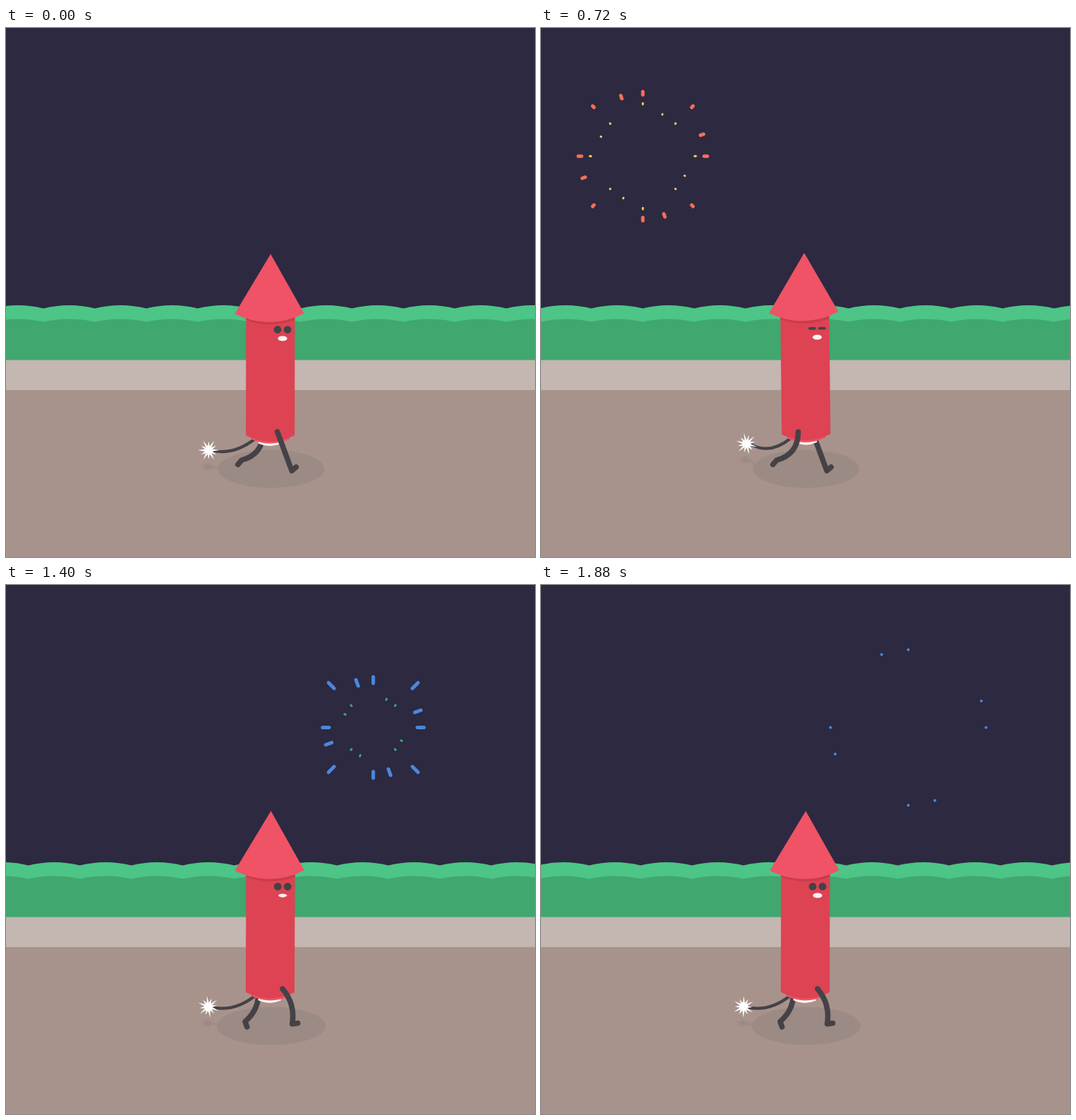
These frames come from a looping animation (748x748 px, 1.92 s). An HTML page with a canvas:

```html
<!DOCTYPE html>
<html lang="en">
<head>
<meta charset="utf-8">
<title>Walking rocket</title>
<style>
  html, body { margin: 0; width: 100%; height: 100%; overflow: hidden; background: #2c2941; }
  canvas { display: block; width: 100vw; height: 100vh; }
</style>
</head>
<body>
<canvas id="stage" width="748" height="748"></canvas>
<script>
const ctx = document.getElementById('stage').getContext('2d');
const SIZE = 748, LOOP = 1920, STEP = 40, STRIDE = 480, TAU = Math.PI * 2;
const DARK = '#454247', RED = '#dd4353', PINK = '#ef5365', SHADE = '#9c8b84', WHITE = '#fbf3f1';

const clamp = v => Math.max(0, Math.min(1, v));
const wave = (t, period, shift = 0) => Math.cos(TAU * (t - shift) / period);
// Rises and falls once between start and start + span
const arch = (t, start, span, skew = 1) => Math.sin(Math.PI * clamp((t - start) / span) ** skew);
// Fast start, slow finish
const glide = (t, start, end) => 1 - (1 - clamp((t - start) / (end - start))) ** 2.5;

function fill(color, d) {
  ctx.fillStyle = color;
  ctx.fill(new Path2D(d));
}

function line(color, width, d) {
  ctx.strokeStyle = color;
  ctx.lineWidth = width;
  ctx.lineCap = ctx.lineJoin = 'round';
  ctx.stroke(new Path2D(d));
}

function band(color, top, bottom) {
  ctx.fillStyle = color;
  ctx.fillRect(0, top, SIZE, bottom - top);
}

function oval(color, x, y, rx, ry) {
  ctx.fillStyle = color;
  ctx.beginPath();
  ctx.ellipse(x, y, rx, ry, 0, 0, TAU);
  ctx.fill();
}

function star(color, x, y, size, turn, flat = 1) {
  ctx.fillStyle = color;
  ctx.beginPath();
  for (let i = 0; i < 24; i++) {
    const r = size * (i % 2 ? 0.36 : i % 4 ? 0.8 : 1);
    const a = turn + i * TAU / 24;
    ctx.lineTo(x + r * Math.cos(a), y + r * flat * Math.sin(a));
  }
  ctx.fill();
}

function burst(t, x, y, bold, thin) {
  const drop = 215;
  if (t > 60 && t < 340) {
    const head = y + drop * (1 - glide(t, 60, 260));
    const tail = y + drop * (1 - glide(t, 170, 380));
    line(thin, 3.6, `M${x - 1.8} ${head}V${tail}`);
  }
  const fade = clamp((t - 720) / 320);

  // Four rays whose outer and inner ends leave the centre one after the other
  function rays(color, width, turn, reach, headStart, tailStart, end) {
    if (t < 340 || t <= headStart || t >= end) return;
    const outer = reach * glide(t, headStart, end);
    const inner = reach * glide(t, tailStart, end);
    for (let i = 0; i < 4; i++) {
      const a = (turn + i * 90) * TAU / 360, c = Math.cos(a), s = Math.sin(a);
      line(color, width, `M${x + inner * c} ${y + inner * s}L${x + outer * c + 0.01} ${y + outer * s}`);
    }
  }
  const wide = 5 - fade, fine = 2.9 - fade * 1.1;
  rays(thin, fine, 0, 78.5, 230, 330, 920);
  rays(thin, fine, 45, 82.5, 440, 450, 1035);
  rays(thin, fine, 25, 82.5, 440, 450, 1035);
  rays(bold, wide, 0, 110, 347, 407, 1083);
  rays(bold, wide, 45, 104, 265, 391, 880);
  rays(bold, wide, -20, 110, 347, 407, 1083);
}

function hedge(t) {
  const gap = 72.7;
  const first = 53 - (t / LOOP * 10 % 1) * gap - gap;
  const layer = (color, cusp, rise) => {
    let d = `M${first} 470V${cusp}`;
    for (let i = 0; i < 13; i++) d += `q${gap / 2} ${-rise * 2} ${gap} 0`;
    fill(color, d + 'V470Z');
  };
  layer('#4cc586', 396.5, 4.5);
  layer('#40a76f', 415.5, 4);
}

function leg(t) {
  t %= STRIDE;
  const k = t / STEP;
  const a = TAU * t / STRIDE;
  const hx = 373.7 - 20 * Math.sin(a - TAU / 12), hy = 571;
  const ax = 368.6 + 33.3 * Math.cos(a) - 8.9 * Math.sin(a) - 3.2 * Math.sin(2 * a) + 2.2 * Math.cos(3 * a);
  const ay = 626 - 17.5 * arch(k, 4.3, 7.7, 0.75);

  // The knee bends at right angles to the line from hip to ankle
  const bend = 27 * arch(k, 2, 10, 1.5) / Math.hypot(ax - hx, ay - hy);
  const kx = (hx + ax) / 2 + bend * (ay - hy);
  const ky = (hy + ay) / 2 - bend * (ax - hx);

  const heel = 40 * Math.max(0, Math.cos(a)) ** 10;
  const toe = (165 * arch(k, 3.2, 8) ** 2 - heel) * TAU / 360;
  line(DARK, 7.6, `M${hx} ${hy}Q${kx} ${ky} ${ax} ${ay}l${8 * Math.cos(toe)} ${8 * Math.sin(toe)}`);
}

function face(t) {
  const open = 1 - 0.64 * arch(t, 640, 160);
  for (const x of [384, 398]) {
    ctx.fillStyle = DARK;
    ctx.beginPath();
    ctx.roundRect(x - 5.4, 426 - 5.4 * open, 10.8, 10.8 * open, 5.4 * open);
    ctx.fill();
  }
  const k = clamp(wave(t, 960) * 3 + 0.9);
  const hx = 3 + 3.5 * k, up = 3.2 + 1.5 * k, down = 3.7 + k;
  fill(WHITE, `M384.5 438.5C${391 - hx} ${438.5 - up} ${391 + hx} ${438.5 - up} 397.5 438.5` +
    `C${391 + hx} ${438.5 + down} ${391 - hx} ${438.5 + down} 384.5 438.5Z`);
}

function body(t) {
  const lean = -(0.5 + 1.35 * wave(t, LOOP, 640)) / 160;
  ctx.save();
  ctx.translate(374, 479.7 + 0.8 * wave(t, STRIDE));
  ctx.rotate(lean);
  ctx.translate(-374, -480);
  fill(WHITE, 'M357 580V587Q373 594 389 587V580Z');
  fill(PINK, 'M347 574V581Q373.5 593 401 581V574Z');
  fill(RED, 'M339.3 405H408.3V575.5Q373.8 593 339.3 575.5Z');
  fill('#c93c4b', 'M339.3 405H408.3V412.5Q373.8 425 339.3 412.5Z');
  fill(PINK, 'M374 319L421.5 403Q373 427.5 323.3 403.7Z');
  face(t);
  ctx.restore();
}

function draw(t) {
  band('#2c2941', 0, SIZE);
  burst(t, 144, 181.3, '#f56e58', '#f2d357');
  burst(t - 800, 519.3, 201.5, '#4c87db', '#40a76f');
  hedge(t);
  band('#c4b6b1', 469.5, 512);
  band('#a8938c', 512, SIZE);

  const bob = wave(t, STRIDE);
  const sx = 288.2 + 1.7 * wave(t, LOOP, 660) - 0.7 * bob;
  const sy = 592.5 + 4.5 * bob;
  const turn = t / STEP * 0.19;
  const low = 615.5 + 5 * bob;
  oval(SHADE, 375, 623.5, 78.7 - 3.3 * wave(t, STRIDE / 2), 27);
  star(SHADE, sx - 1.5, low, 12, turn, 0.7);
  line(SHADE, 3, `M${sx} ${low}Q${sx + 9} ${low + 1} 304 622`);

  line(DARK, 4.2, `M${sx + 7} ${sy + 1}Q323 603.5 352 581`);
  leg(t + STRIDE / 2);
  body(t);
  leg(t);
  star('#fff', sx, sy, 15.5, turn);
}

const start = performance.now();
function tick() {
  const t = (performance.now() - start) % LOOP;
  draw(Math.floor(t / STEP) * STEP);
  requestAnimationFrame(tick);
}
tick();
</script>
</body>
</html>
```
